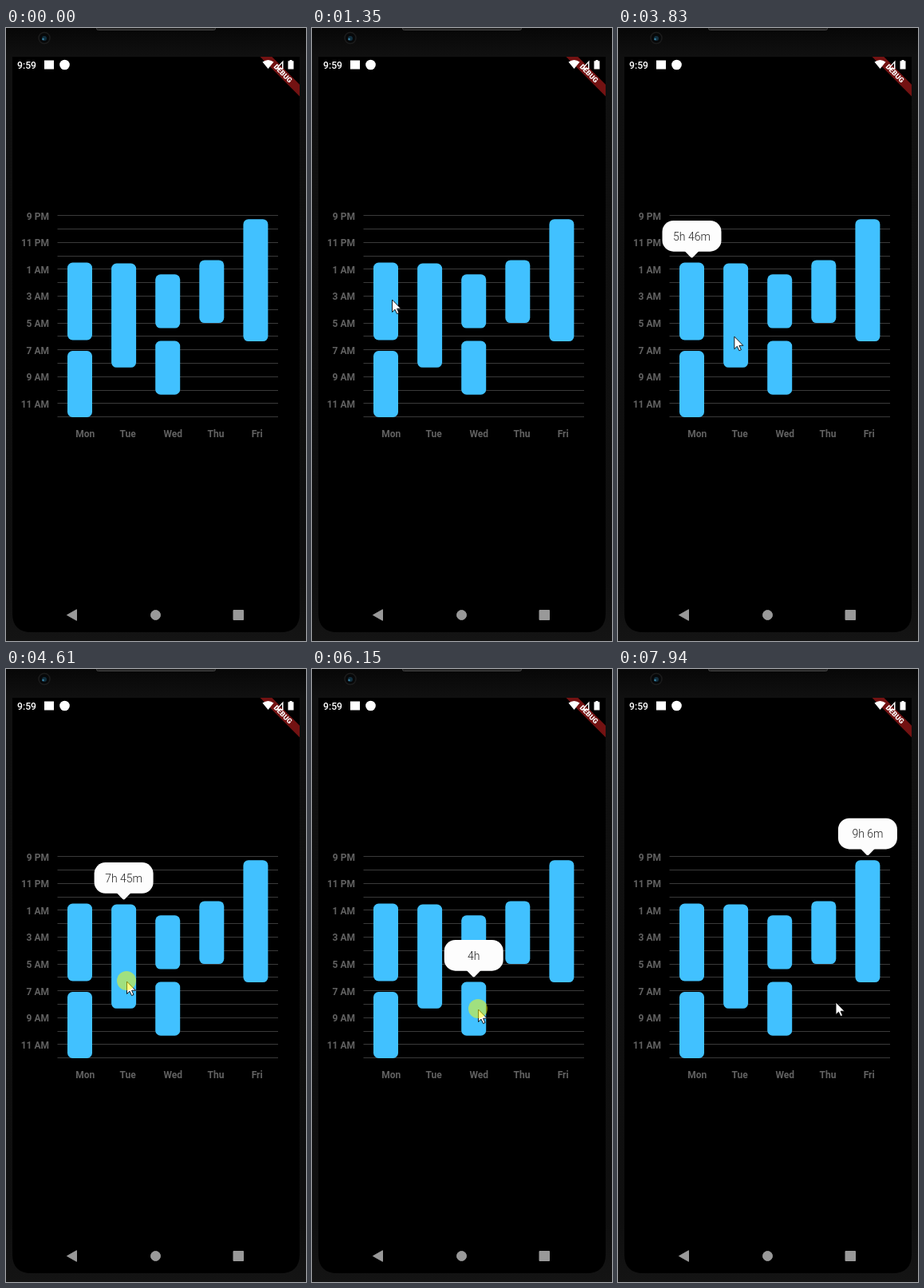
Recreate the animation shown at these times as an HTML page. Size 376 px wide and 767 px high, loop 8000 ms.

```html
<!DOCTYPE html>
<html lang="en">
<head>
<meta charset="utf-8">
<title>Sleep chart</title>
<style>
  html, body { margin: 0; width: 100%; height: 100%; overflow: hidden; background: #000; }
  svg { display: block; width: 376px; height: 767px; font-family: Roboto, sans-serif; }
  .label { font-size: 12px; font-weight: 700; fill: #616161; }
  .bar { fill: #41c1ff; }
</style>
</head>
<body>
<svg viewBox="0 0 376 767">
  <defs>
    <linearGradient id="bezel" x2="0" y2="1">
      <stop stop-color="#070707"/><stop offset=".045" stop-color="#101010"/>
      <stop offset=".9" stop-color="#0f0f0f"/><stop offset="1" stop-color="#141414"/>
    </linearGradient>
    <clipPath id="screen"><path d="M8 36H368V732Q368 756 344 756H32Q8 756 8 732Z"/></clipPath>
  </defs>
  <rect width="376" height="767" fill="url(#bezel)"/>
  <rect x="113.5" y="-4" width="149" height="6.5" rx="2" fill="#222" stroke="#444"/>
  <circle cx="48" cy="12.5" r="7" fill="#070809" stroke="#1c1c1c" stroke-width="1.5"/>
  <circle cx="48" cy="13" r="3" fill="#12303f"/>
  <circle cx="46.5" cy="14" r="1.2" fill="#3c86a8"/>

  <g clip-path="url(#screen)">
    <rect x="8" y="36" width="360" height="720"/>
    <g transform="translate(368 36) rotate(45)">
      <rect x="-35" y="24.5" width="70" height="10.5" fill="#731212"/>
      <text y="32.6" text-anchor="middle" font-size="8.9" font-weight="900" fill="#fff">DEBUG</text>
    </g>
  </g>

  <g fill="#fff">
    <text x="14" y="50.5" font-size="12.2" font-weight="500">9:59</text>
    <rect x="48" y="40.5" width="12" height="11"/>
    <circle cx="73.5" cy="46" r="6.3"/>
    <path d="M321.5 42.5Q328.5 37.5 335.5 42.5L328.5 51Z"/>
    <path d="M347.5 40.5V51.5H337.500ZM346 44 340.800 50H346Z" fill-rule="evenodd"/>
    <path d="M355.5 40H358.5V41.3H360.5V51.5H353.5V41.3H355.5Z"/>
  </g>

  <g fill="#999" stroke="#999" stroke-linejoin="round">
    <path d="M76.5 734.5 88.5 727.7V741.3Z"/>
    <circle cx="187.5" cy="734.5" r="6"/>
    <rect x="285" y="728.5" width="12.5" height="12"/>
  </g>

  <g id="chart"></g>
  <g id="tip" fill="#fdfdfd">
    <rect x="-37" y="-52.5" width="74" height="38.7" rx="14"/>
    <path d="M-9-14.5H9L1.5-6.8Q0-5.4-1.5-6.8Z"/>
    <text id="tipText" y="-28" font-size="14" font-weight="300" fill="#222" text-anchor="middle"></text>
  </g>
  <path id="resize" d="M0-12 4.5-7H1.5V7H4.5L0 12-4.5 7H-1.5V-7H-4.5Z" fill="#fff" stroke="#000"/>
  <path id="arrow" d="M.5 1V16.5L4 13.2 6.5 18.6 9 17.5 6.6 12.2H11.5Z" fill="#fff" stroke="#000" stroke-width=".9"/>
  <circle id="press" r="12" fill="#ff0" fill-opacity=".5"/>
</svg>
<script>
const DURATION = 8000;
const FRAME = 75;
const LONG_PRESS = 540;
const ENTER = 70, HIDE = 890;
const TOP = 234.7, HOUR = 16.8;
const DAY_WIDTH = 55.1, BAR_WIDTH = 31;

// Sleep per day: minutes after 9 PM, length in minutes
const sleep = {
  Mon: [[210, 346], [605, 296]],
  Tue: [[214, 465]],
  Wed: [[263, 240], [560, 240]],
  Thu: [[199, 281]],
  Fri: [[16, 546]]
};
const days = Object.keys(sleep);

// Pointer stops: when it leaves for the stop, frames on the way, and the press there
const stops = [
  { leave: ENTER, frames: 9, x: 88, y: 315 },
  { leave: 810, frames: 1, x: 100, y: 339, down: 1270, up: 1350 },
  { leave: 1810, frames: 2, x: 100, y: 346, down: 2590, up: 3520, day: 'Mon', nap: 0 },
  { leave: 3600, frames: 6, x: 151, y: 390, down: 4060, up: 4910, day: 'Tue', nap: 0 },
  { leave: 5220, frames: 3, x: 208, y: 425, down: 5600, up: 6460, day: 'Wed', nap: 1 },
  { leave: 6610, frames: 5, x: 320, y: 371, down: 7010, up: 7710, day: 'Fri', nap: 0 },
  { leave: 7790, frames: 3, x: 272.5, y: 416 }
];

const el = id => document.getElementById(id);
const columnX = day => 77 + days.indexOf(day) * DAY_WIDTH;
const timeY = minutes => TOP + minutes / 60 * HOUR;

function drawChart() {
  let out = '';
  for (let i = 0; i < 16; i++) {
    const y = timeY(i * 60);
    out += `<path d="M64.5 ${Math.floor(y) + 0.5}H341" stroke="#3a3a3a"/>`;
    if (i % 2 === 0) {
      const hour = (21 + i) % 24;
      out += `<text class="label" x="54" y="${y + 4.8}" text-anchor="end">` +
        `${hour % 12 || 12} ${hour < 12 ? 'AM' : 'PM'}</text>`;
    }
  }
  for (const day of days) {
    out += `<text class="label" x="${columnX(day) + 10.3}" y="512">${day}</text>`;
    for (const [start, length] of sleep[day]) {
      out += `<rect class="bar" x="${columnX(day)}" y="${timeY(start)}" ` +
        `width="${BAR_WIDTH}" height="${length / 60 * HOUR}" rx="6.5"/>`;
    }
  }
  el('chart').innerHTML = out;
}

function formatLength(minutes) {
  const rest = minutes % 60;
  return Math.floor(minutes / 60) + 'h' + (rest ? ` ${rest}m` : '');
}

function pointerAt(time) {
  let x = 335, y = 786;
  for (const stop of stops.filter(s => time >= s.leave)) {
    const frame = Math.floor((time - stop.leave) / FRAME) + 1;
    const eased = 1 - (1 - Math.min(1, frame / stop.frames)) ** 2;
    x += (stop.x - x) * eased;
    y += (stop.y - y) * eased;
  }
  return `translate(${x} ${y})`;
}

function show(id, visible, place) {
  el(id).setAttribute('visibility', visible ? 'visible' : 'hidden');
  if (visible) el(id).setAttribute('transform', place);
}

// A long press opens the tip, the next press closes it.
function showTip(tap, time) {
  const open = Boolean(tap && tap.day) && time >= tap.down + LONG_PRESS;
  if (!open) return show('tip', false);
  const [start, length] = sleep[tap.day][tap.nap];
  el('tipText').textContent = formatLength(length);
  show('tip', true, `translate(${columnX(tap.day) + BAR_WIDTH / 2} ${timeY(start)})`);
}

function render(time) {
  const tap = stops.filter(s => time >= s.down).pop();
  const place = pointerAt(time);
  show('resize', time >= ENTER && time < HIDE, place);
  show('arrow', Boolean(tap), place);
  show('press', Boolean(tap) && time < tap.up, place);
  showTip(tap, time);
}

drawChart();
const began = performance.now();
function loop() {
  render((performance.now() - began) % DURATION);
  requestAnimationFrame(loop);
}
loop();
</script>
</body>
</html>
```
